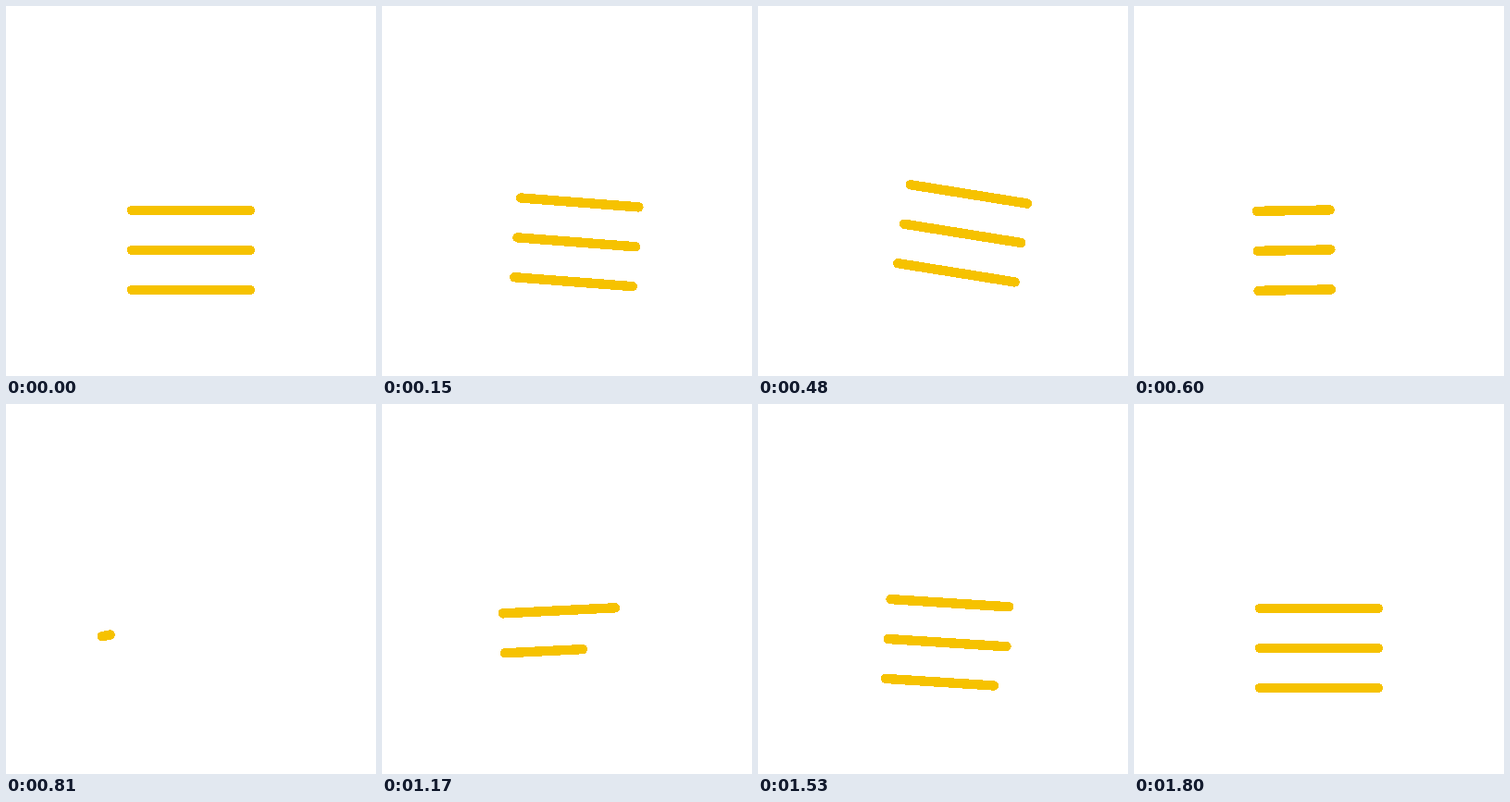
An HTML page for the animation above (2360 ms loop, 400 px wide and 400 px high).

```html
<!DOCTYPE html>
<html lang="en">
<head>
<meta charset="utf-8">
<title>Swinging menu</title>
<style>
  html, body { margin: 0; width: 100%; height: 100%; overflow: hidden; background: #fff; }
  svg { display: block; width: 100%; height: 100%; }
  line { stroke: #f6c200; stroke-width: 10.4; stroke-linecap: round; shape-rendering: crispEdges; }
</style>
</head>
<body>
<svg viewBox="0 0 400 400">
  <g id="menu">
    <line x1="-64" y1="-43" x2="64" y2="-43"/>
    <line x1="-64" y1="0" x2="64" y2="0"/>
    <line x1="-64" y1="43" x2="64" y2="43"/>
  </g>
</svg>
<script>
const LOOP = 2360, STEP = 30, LENGTH = 128;
const menu = document.getElementById('menu');
const bars = [...menu.children];

const clamp = v => Math.min(1, Math.max(0, v));
const span = (t, a, b) => clamp((t - a) / (b - a));
const inOut = power => p => p < 0.5
  ? Math.pow(2 * p, power) / 2
  : 1 - Math.pow(2 - 2 * p, power) / 2;
const soft = inOut(1.85), strong = inOut(3);

// Each leg: start, end, value reached, easing
const tracks = {
  x: [[0, 335, 25.3, soft], [345, 840, -25.4, strong], [870, 1385, 9.2, soft], [1385, 1675, 0, soft]],
  y: [[0, 335, -21.3, soft], [345, 840, 17.3, strong], [935, 1385, -10.8, soft], [1385, 1690, 0, soft]],
  turn: [[0, 335, 10.9, soft], [345, 840, -11, strong], [840, 1470, 4, soft], [1470, 1800, 0, soft]]
};

function valueAt(legs, t) {
  let v = 0;
  for (const [a, b, to, ease] of legs) {
    if (t < a) break;
    v += (to - v) * ease(span(t, a, b));
  }
  return v;
}

const drawStart = [792, 967, 1182], drawTime = 490, swap = 720;

function barLength(i, t) {
  if (t < swap) return 1 - span(t, 510, 655) ** 2;
  return 1 - (1 - span(t, drawStart[i], drawStart[i] + drawTime)) ** 2;
}

function render(t) {
  const x = 200 + valueAt(tracks.x, t);
  const y = 264 + valueAt(tracks.y, t);
  const turn = valueAt(tracks.turn, t);
  menu.setAttribute('transform', `translate(${x} ${y}) rotate(${turn})`);
  bars.forEach((bar, i) => {
    const part = barLength(i, t);
    bar.setAttribute('x2', -64 + LENGTH * part);
    bar.setAttribute('visibility', part > 0 ? 'visible' : 'hidden');
  });
}

const begin = performance.now();
function tick() {
  const t = (performance.now() - begin) % LOOP;
  render(Math.floor(t / STEP) * STEP);
  requestAnimationFrame(tick);
}
render(0);
requestAnimationFrame(tick);
</script>
</body>
</html>
```
